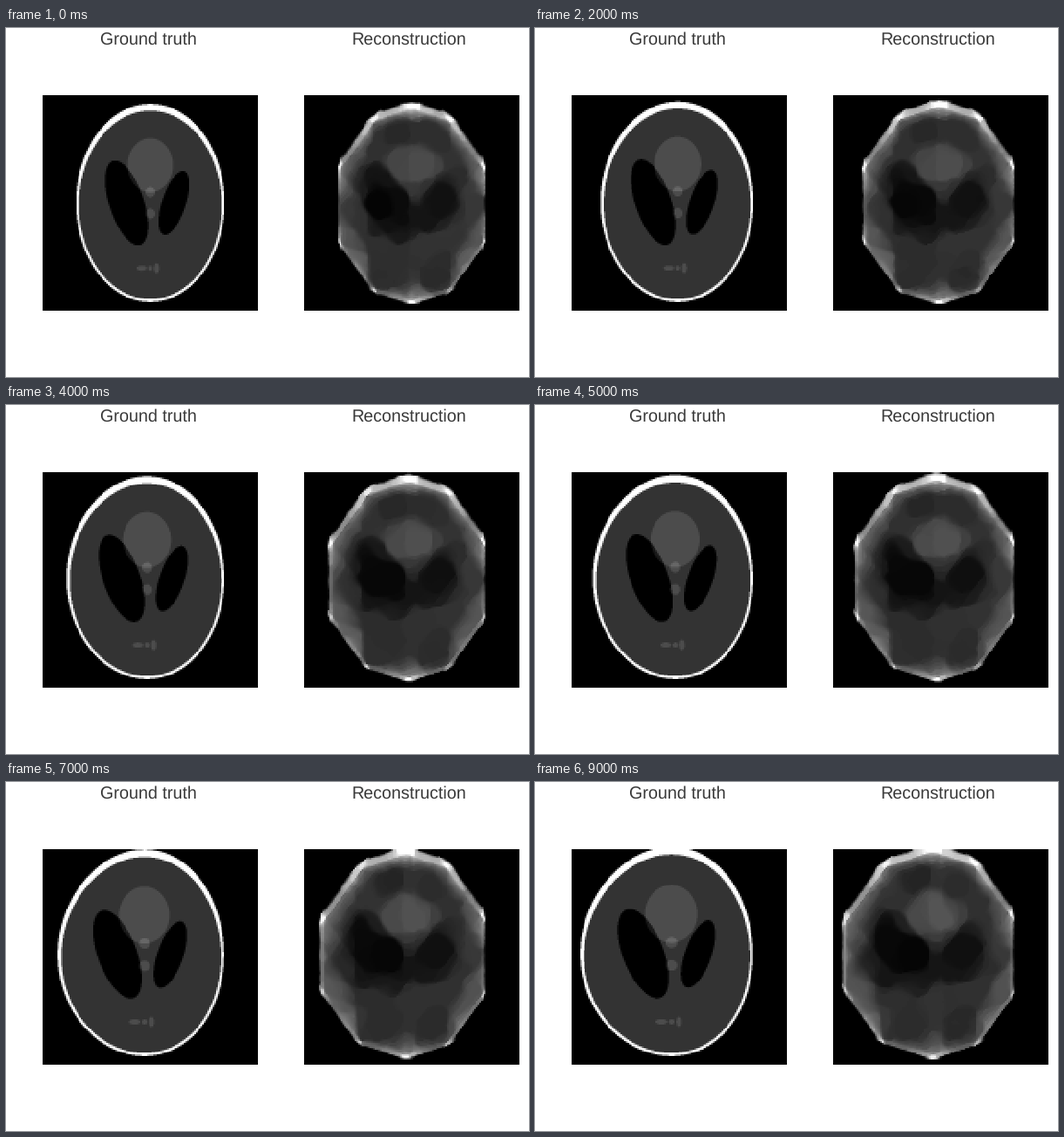
Write a matplotlib script that moves like this. It is 600 by 400 pixels and loops after 10000 ms.

```python
import numpy as np
import matplotlib.pyplot as plt
from matplotlib.animation import FuncAnimation

W, H, DPI = 600, 400, 100
N, FINE = 128, 3
FRAMES, STEP_MS = 10, 1000
ANGLES = np.arange(5) * np.pi / 5
BINS = 184
TV_WEIGHT, ITERATIONS = 0.002, 320
STRETCH_X, STRETCH_Y = .125, .05

plt.rcParams["text.hinting"] = "none"


def centres(count):
    return (np.arange(count) + .5) * 2 / count - 1


def warp(pos, amount):
    """Quadratic stretch that grows with the distance from pos = 1."""
    return pos + amount / 2 * (1 - pos) ** 2


def phantom(n):
    """Shepp-Logan head, stretched to the left and upwards by step n."""
    grow = n / (FRAMES - 1)
    axis = centres(N * FINE)
    x = warp(axis, STRETCH_X * grow)[None, :]
    y = -warp(axis, STRETCH_Y * grow)[:, None]
    img = np.zeros((N * FINE, N * FINE))

    def add(value, a, b, cx=0, cy=0, tilt=0):
        c, s = np.cos(np.radians(tilt)), np.sin(np.radians(tilt))
        u = (x - cx) * c + (y - cy) * s
        v = (y - cy) * c - (x - cx) * s
        img[(u / a) ** 2 + (v / b) ** 2 <= 1] += value

    add(1, .69, .92)
    add(-.8, .6624, .874, cy=-.0184)
    add(-.2, .11, .31, cx=.22, tilt=-18)
    add(-.2, .16, .41, cx=-.22, tilt=18)
    add(.1, .21, .25, cy=.35)
    for cy in (.1, -.1):
        add(.1, .046, .046, cy=cy)
    add(.1, .046, .023, cx=-.08, cy=-.605)
    add(.1, .023, .023, cy=-.605)
    add(.1, .023, .046, cx=.06, cy=-.605)
    return np.clip(img, 0, 1).reshape(N, FINE, N, FINE).mean((1, 3))


class Beam:
    """Parallel projections with linear detector weights."""

    def __init__(self, pixels):
        axis = centres(N) * N / 2
        x, y = np.meshgrid(axis, -axis)
        x, y = x.ravel()[pixels], y.ravel()[pixels]
        pos = np.array([x * np.cos(t) + y * np.sin(t) for t in ANGLES])
        pos += BINS / 2 - .5
        low = np.floor(pos).astype(int)
        scale = 1 / np.sqrt(N)
        self.hi = (pos - low) * scale
        self.lo = scale - self.hi
        self.low = low + np.arange(len(ANGLES))[:, None] * BINS
        self.index = np.concatenate([self.low.ravel(), self.low.ravel() + 1])
        self.weight = np.stack([self.lo, self.hi])
        self.pixels = pixels

    def project(self, imgs):
        flat = imgs.reshape(len(imgs), -1)[:, self.pixels]
        size = len(ANGLES) * BINS
        return np.array([np.bincount(self.index, (self.weight * f).ravel(), size)
                         for f in flat])

    def backproject(self, sino):
        out = np.zeros((len(sino), N * N))
        total = 0
        for i, lo, hi in zip(self.low, self.lo, self.hi):
            total = total + sino[:, i] * lo + sino[:, i + 1] * hi
        out[:, self.pixels] = total
        return out.reshape(-1, N, N)


def reconstruct(imgs):
    """Total variation with non-negativity, by a primal-dual iteration."""
    beam = Beam(np.arange(N * N))
    data = beam.project(imgs)
    # A pixel on any empty ray has to be empty
    hit = (data > .02).astype(float)
    full = beam.backproject(np.ones_like(hit))
    support = beam.backproject(hit) > full - .02
    beam = Beam(np.flatnonzero(support.any(0)))

    x = np.zeros_like(imgs)
    bar = x.copy()
    gx, gy = np.zeros_like(x), np.zeros_like(x)
    res = np.zeros_like(data)
    ratio = 8
    tau, sigma_data, sigma_grad = .11 * ratio, 1 / ratio, .5 / ratio
    for _ in range(ITERATIONS):
        res = (res + sigma_data * (beam.project(bar) - data)) / (1 + sigma_data)
        gx[:, :, :-1] += sigma_grad * np.diff(bar, axis=2)
        gy[:, :-1] += sigma_grad * np.diff(bar, axis=1)
        norm = np.maximum(1, np.sqrt(gx * gx + gy * gy) / TV_WEIGHT)
        gx /= norm
        gy /= norm
        step = beam.backproject(res) - gx - gy
        step[:, :, 1:] += gx[:, :, :-1]
        step[:, 1:] += gy[:, :-1]
        new = np.maximum(x - tau * step, 0) * support
        bar = 2 * new - x
        x = new
    return x


truth = np.array([phantom(n) for n in range(FRAMES)])
recon = reconstruct(truth)

fig = plt.figure(figsize=(W / DPI, H / DPI), dpi=DPI, facecolor="white")


def panel(left, title, title_x, img):
    width, height = 246.2, 246.6
    ax = fig.add_axes([left / W, 1 - (77 + height) / H, width / W, height / H])
    ax.axis("off")
    fig.text(title_x / W, 1 - 19 / H, title, ha="center", va="baseline",
             family="Liberation Sans", fontsize=14.25, color="#3a3a3a")
    return ax.imshow(img, cmap="gray", vmin=0, vmax=1,
                     interpolation="nearest", aspect="auto")


left_img = panel(41.6, "Ground truth", 163.3, truth[0])
right_img = panel(341.6, "Reconstruction", 462.5, recon[0])


def update(n):
    left_img.set_data(truth[n])
    right_img.set_data(recon[n])
    return left_img, right_img


anim = FuncAnimation(fig, update, frames=FRAMES, interval=STEP_MS, repeat=True)
plt.show()
```
